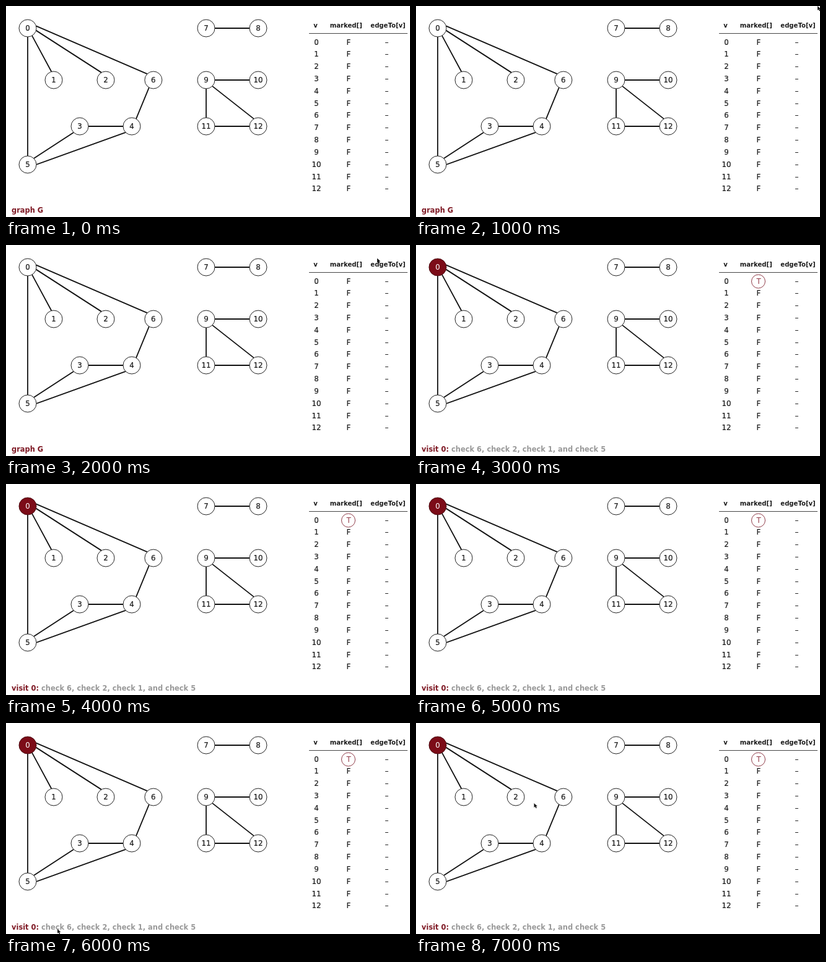
Animation, 652 px wide and 342 px high, one loop 8 s. Source, as an HTML page:

```html
<!DOCTYPE html>
<html lang="en">
<head>
<meta charset="utf-8">
<title>Depth-first search</title>
<style>
  html, body { margin: 0; width: 100%; height: 100%; overflow: hidden; background: #fff; }
  svg { display: block; width: 652px; height: 342px; font: 11.8px "DejaVu Sans", sans-serif; fill: #1c1c1c; }
  .edge { stroke: #111; stroke-width: 1.8; }
  .rule { stroke: #444; stroke-width: 1; }
  .node { fill: #fff; stroke: #222; stroke-width: 1; }
  .mid { text-anchor: middle; stroke: #1c1c1c; stroke-width: 0.2; }
  .head { font-size: 10.1px; font-weight: bold; stroke: none; }
  .note { font-size: 11.45px; font-weight: bold; fill: #7f1a25; }
  .todo { fill: #999; }
  .visited .node { fill: #7c0c18; stroke: #4a0a10; }
  .visited text { fill: #fff; stroke: none; }
  .ring { fill: none; stroke: #8f3a47; stroke-width: 1; }
  .mark { fill: #963c4b; stroke: none; }
</style>
</head>
<body>
<svg id="stage" viewBox="0 0 652 342"></svg>
<script>
const LOOP = 8000;
const VISIT_AT = 3000;
const RADIUS = 14;
const ROWS = [36, 120, 195, 257];
const stage = document.getElementById("stage");

function add(tag, attrs, parent = stage, text) {
  const el = document.createElementNS("http://www.w3.org/2000/svg", tag);
  for (const key in attrs) el.setAttribute(key, attrs[key]);
  if (text !== undefined) el.textContent = text;
  parent.appendChild(el);
  return el;
}
const line = (x1, y1, x2, y2, cls) => add("line", { x1, y1, x2, y2, class: cls });
const label = (x, y, text, cls = "mid", parent = stage) => add("text", { x, y, class: cls }, parent, text);

// Left component: [column, row] of each vertex; right component: two per row
const left = [[0, 0], [1, 1], [3, 1], [2, 2], [4, 2], [0, 3], [4.83, 1]];
const nodes = left.map(([col, row]) => [35 + 42 * col, ROWS[row]]);
for (const y of ROWS.slice(0, 3)) nodes.push([323, y], [407, y]);

// Edges leave and enter a vertex at a clock hour on its rim
function rim(v, hour) {
  const angle = (hour - 3) * Math.PI / 6;
  return [nodes[v][0] + RADIUS * Math.cos(angle), nodes[v][1] + RADIUS * Math.sin(angle)];
}
const connect = (a, hourA, b, hourB) => line(...rim(a, hourA), ...rim(b, hourB), "edge");

connect(0, 2.5, 6, 10.5);
connect(0, 3.5, 2, 11);
connect(0, 5, 1, 11.5);
connect(5, 1.5, 3, 7.5);
connect(5, 3, 4, 7.5);
connect(4, 1, 6, 7);
connect(9, 4.5, 12, 11);
for (const [a, b] of [[3, 4], [7, 8], [9, 10], [11, 12]]) connect(a, 3, b, 9);
for (const [a, b] of [[0, 5], [9, 11]]) connect(a, 6, b, 12);

const nodeGroups = nodes.map(([cx, cy], i) => {
  const g = add("g", {});
  add("circle", { cx, cy, r: RADIUS, class: "node" }, g);
  label(cx, cy + 4, i, "mid", g);
  return g;
});

// Table
label(499.5, 34.5, "v", "mid head");
label(548.8, 34.5, "marked[]", "mid head");
label(616.5, 34.5, "edgeTo[v]", "mid head");
line(489, 44.5, 648, 44.5, "rule");
const flags = nodes.map((_, i) => {
  const y = 62.5 + i * 19.83;
  label(501, y, i);
  label(614.5, y, "–");
  return label(553, y, "F");
});
const ring = add("circle", { cx: 552.5, cy: 59, r: 11, class: "ring" });

// Captions
const title = label(9, 335, "graph G", "note");
const visit = label(9, 335, "visit 0:", "note");
add("tspan", { class: "todo" }, visit, " check 6, check 2, check 1, and check 5");

const pointer = add("path", { d: "M0 0V7L1.7 5.5L3 8.2L4.4 7.5L3.1 5H5.4Z", fill: "#111" });

// Pointer tip for each second in which it is visible
const pointerAt = { 1: [648, 0], 2: [599, 21.5], 6: [83, 334], 7: [190.5, 130] };

const show = (el, on) => el.setAttribute("visibility", on ? "visible" : "hidden");

function draw(t) {
  const started = t >= VISIT_AT;
  show(title, !started);
  show(visit, started);
  show(ring, started);
  nodeGroups[0].setAttribute("class", started ? "visited" : "");
  flags[0].textContent = started ? "T" : "F";
  flags[0].setAttribute("class", started ? "mid mark" : "mid");

  const tip = pointerAt[Math.floor(t / 1000)];
  show(pointer, tip);
  if (tip) pointer.setAttribute("transform", `translate(${tip})`);
}

const start = performance.now();
function tick() {
  draw((performance.now() - start) % LOOP);
  requestAnimationFrame(tick);
}
tick();
</script>
</body>
</html>
```
